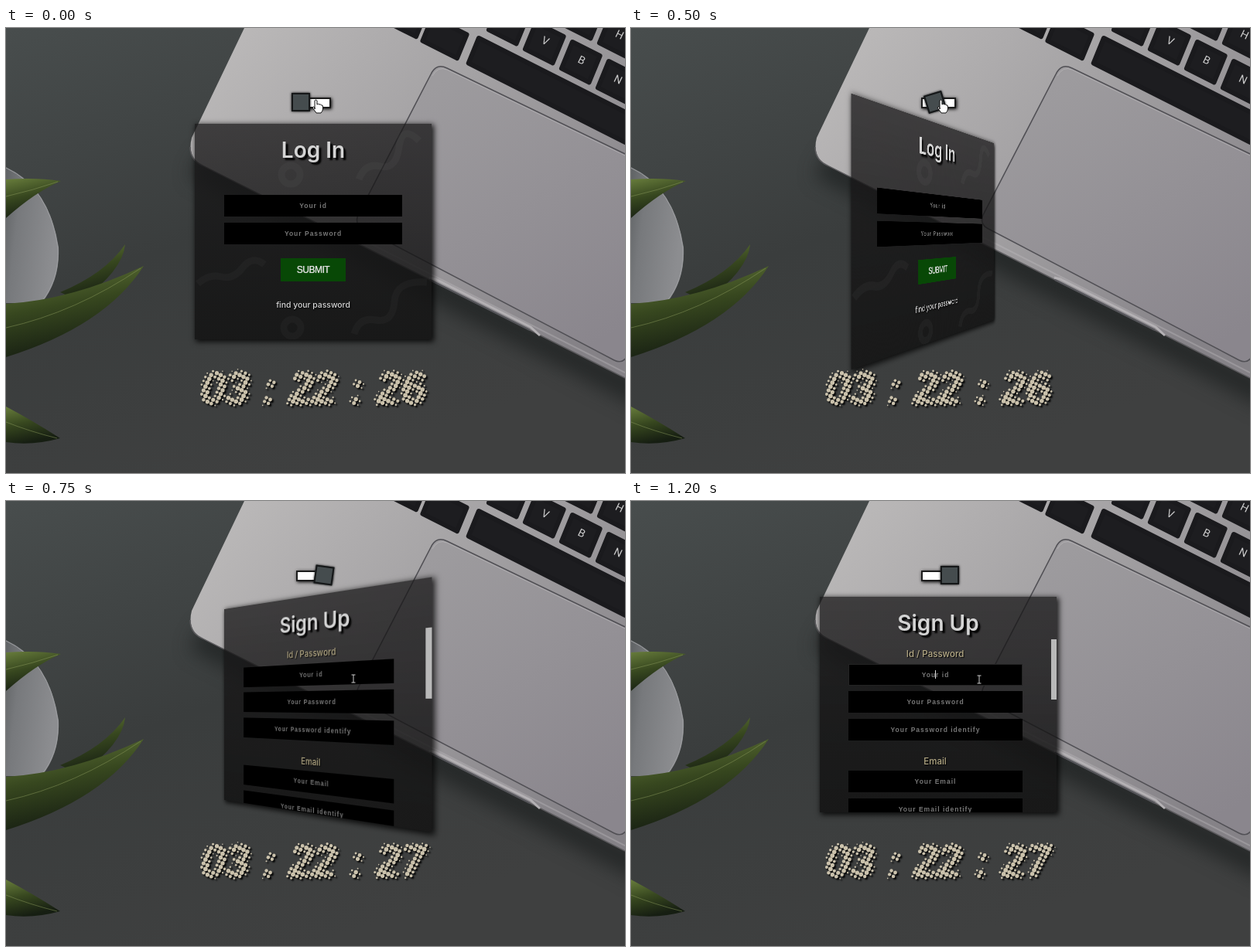
Animation, 800 px wide and 576 px high, one loop 1250 ms. Source, as an HTML page with a canvas:

```html
<!DOCTYPE html>
<html lang="en">
<head>
<meta charset="utf-8">
<title>Flip login card</title>
<style>
html, body { margin: 0; width: 100%; height: 100%; overflow: hidden; background: #3c3e3e; }
#stage { position: relative; width: 800px; height: 576px; overflow: hidden; }
#stage > *, .card > * { position: absolute; }
#scene, #clock, #cursor { left: 0; top: 0; }
.card {
  left: 244px; top: 124px; width: 306px; height: 279px; overflow: hidden;
  background: linear-gradient(rgba(25,24,25,.76), rgba(18,18,18,.85));
  box-shadow: 2px 2px 7px 1px rgba(0,0,0,.85);
}
.card svg { left: 0; top: 0; }
.card div { box-sizing: border-box; text-align: center; white-space: nowrap; }
.title { font: 600 28px Inter, sans-serif; color: #d4d4d4; text-shadow: 3px 3px 2px #000; }
.label { font: 500 11.5px Inter, sans-serif; color: #b5aa86; text-shadow: 1px 1px 1px #000; }
.link { font: 500 10.4px Inter, sans-serif; color: #d8d8d8; text-shadow: 1px 1px 2px #000; }
.field { font: bold 8.5px "Liberation Sans", Arial, sans-serif; letter-spacing: 1px; color: #777; background: #000; }
.button { font: 12px "Liberation Sans", Arial, sans-serif; letter-spacing: -.5px; color: #e6e6e6; background: #084806; text-shadow: 0 0 1px #ccc; }
.bar { background: #b9b9b9; }
.caret { background: #ddd; }
#track { left: 375px; top: 90px; width: 41px; height: 10px; border: 2px solid #1c1c1c; background: #fff; box-shadow: 1px 1px 4px #000; }
#knob { left: -12px; top: -12px; width: 20px; height: 20px; border: 2px solid #151718; background: #454c4e; box-shadow: 0 0 3px #000; }
</style>
</head>
<body>
<div id="stage">
  <svg id="scene" width="800" height="576">
    <defs>
      <linearGradient id="desk" x2=".5" y2="1">
        <stop stop-color="#484d4d"/><stop offset=".5" stop-color="#3a3d3d"/><stop offset="1" stop-color="#3f4040"/>
      </linearGradient>
      <linearGradient id="metal" gradientUnits="userSpaceOnUse" x1="270" y1="40" x2="720" y2="420">
        <stop stop-color="#bab8b8"/><stop offset=".45" stop-color="#a4a2a4"/><stop offset="1" stop-color="#858287"/>
      </linearGradient>
      <linearGradient id="pad" gradientUnits="userSpaceOnUse" x1="540" y1="80" x2="740" y2="420">
        <stop stop-color="#9d9b9e"/><stop offset="1" stop-color="#8a868d"/>
      </linearGradient>
      <linearGradient id="pot" x2="1" y2=".3">
        <stop stop-color="#5f6264"/><stop offset=".3" stop-color="#77797c"/><stop offset="1" stop-color="#8c8d90"/>
      </linearGradient>
      <linearGradient id="leaf" x2=".3" y2="1">
        <stop stop-color="#687d3c"/><stop offset=".5" stop-color="#37471f"/><stop offset="1" stop-color="#161e12"/>
      </linearGradient>
      <filter id="soft" x="-20%" y="-20%" width="140%" height="140%" color-interpolation-filters="sRGB">
        <feGaussianBlur stdDeviation="12"/>
      </filter>
    </defs>
    <rect width="800" height="576" fill="url(#desk)"/>
    <path d="M246 176L830 478" stroke="#17191a" stroke-opacity=".6" stroke-width="36" filter="url(#soft)"/>
    <path d="M308 0L240 142Q234 166 252 177L800 453V0Z" fill="url(#metal)"/>
    <path d="M238 154Q238 170 252 177L800 453" fill="none" stroke="#5c5b5e" stroke-width="1.5"/>
    <path d="M455 271L800 446" stroke="#c0bdc0" stroke-opacity=".35" stroke-width="2"/>
    <path d="M547 323L555 325 678 387 690 398" fill="none" stroke="#b4b1b4" stroke-width="3"/>
    <path d="M548 326L677 391" stroke="#55555a" stroke-width="2"/>
    <path d="M800 163L570 52Q556 45 549 60L455 242Q450 254 462 260L786 430Q796 435 802 426" fill="url(#pad)" stroke="#515055" stroke-width="1.6"/>
    <path d="M800 165L570 54Q558 49 551 62" fill="none" stroke="#c4c2c4" stroke-opacity=".5"/>
    <g id="keys" fill="#1d1d20" stroke="#1a1a1d" stroke-width="6" stroke-linejoin="round"></g>
    <path d="M0 180Q56 206 68 284Q70 326 46 356H0Z" fill="url(#pot)"/>
    <path d="M0 181Q56 207 67 284Q69 326 46 354" fill="none" stroke="#9c9da0"/>
    <g fill="url(#leaf)">
      <path d="M0 196Q38 193 71 198Q38 212 0 246Z"/>
      <path d="M70 342Q128 318 154 280Q151 314 96 354Z"/>
      <path d="M0 357Q85 352 178 308Q128 386 0 426Z"/>
      <path d="M0 490Q34 508 70 531Q35 541 0 536Z"/>
    </g>
    <path d="M0 388Q90 368 174 311M0 218Q35 210 67 199M0 510Q30 522 66 531" fill="none" stroke="#8a9a5c" stroke-opacity=".5"/>
  </svg>
  <div class="card" id="login"></div>
  <div class="card" id="signup"></div>
  <canvas id="clock" width="800" height="576"></canvas>
  <div id="track"></div>
  <div id="knob"></div>
  <svg id="cursor" width="800" height="576" fill="#fff" stroke="#111">
    <path id="hand" d="M-2 6V-5Q-.5-7 1-5V0Q2.500-1.500 4 0Q5.500-1 6.500 1Q8.500 0 8.500 3V6Q8 9 6 11H0Q-2 8-5 4Q-4 2-2 4Z"/>
    <path id="arrow" d="M0 0V12L3 9.500 5 14 7 13 5 8.500H9Z"/>
    <path id="beam" d="M-2.500-5H2.500M0-5V5M-2.500 5H2.500" stroke="#ccc"/>
  </svg>
</div>
<script>
const $ = id => document.getElementById(id);
const LOOP = 1250, STEP = 50;

// Keyboard: each key is a slanted quad given by its top left corner and size
function key(x, y, letter = '', w = 40, h = 37) {
  const px = w * .89, py = w * .45, qx = -h * .38, qy = h * .93;
  $('keys').innerHTML += `<path d="M${x} ${y}l${px} ${py} ${qx} ${qy} ${-px} ${-py}z"/>
    <text transform="translate(${x + (px + qx) / 2} ${y + (py + qy) / 2}) rotate(26)" text-anchor="middle" y="2"
    font-family="Roboto, sans-serif" font-size="14" fill="#ccc" stroke="none">${letter}</text>`;
}
[[685, -7, 'V'], [732, 18, 'B'], [779, 43, 'N'], [638, -32], [781, -15, 'H'], [734, -39],
 [551, -14, '', 50, 33], [498, -42, '', 50, 33], [611, 13, '', 260, 35]].forEach(k => key(...k));

// Card contents, placed in stage coordinates
function box(card, cls, x, y, w, h, text = '') {
  const el = document.createElement('div');
  el.className = cls;
  el.textContent = text;
  el.style.cssText = `left:${x - 244}px;top:${y - 124}px;width:${w}px;height:${h}px;line-height:${h}px`;
  $(card).append(el);
  return el;
}
$('login').innerHTML = `<svg width="306" height="279" fill="none" stroke="#fff" stroke-opacity=".028" stroke-width="9">
  <path d="M4 207Q18 194 34 198T62 186T90 182M206 272Q212 250 234 254T258 230T300 205M212 72Q220 50 240 55T264 30T290 22"/>
  <circle cx="124" cy="66" r="12"/><circle cx="126" cy="264" r="11"/></svg>`;
box('login', 'title', 297, 141, 200, 34, 'Log In');
box('login', 'field', 282, 216, 230, 28, 'Your id');
box('login', 'field', 282, 252, 230, 28, 'Your Password');
box('login', 'button', 355, 298, 84, 30, 'SUBMIT');
box('login', 'link', 297, 349, 200, 20, 'find your password');

box('signup', 'title', 297, 141, 200, 34, 'Sign Up');
box('signup', 'label', 293, 188, 200, 20, 'Id / Password');
box('signup', 'label', 293, 327, 200, 20, 'Email');
const fields = [[211, 'Your id'], [246, 'Your Password'], [282, 'Your Password identify'],
  [349, 'Your Email'], [385, 'Your Email identify']]
  .map(([y, text]) => box('signup', 'field', 281, y, 225, 28, text));
box('signup', 'bar', 543, 179, 7, 78);
const caret = box('signup', 'caret', 393, 219, 1, 11);

// Halftone clock: sample blurred text on a tilted square grid
const ctx = $('clock').getContext('2d');
const centers = [268, 299, 341, 382, 412, 454, 495, 527];
const PITCH = 5.5, TILT = .46;
function drawClock(time) {
  const ink = new OffscreenCanvas(800, 576).getContext('2d');
  ink.font = 'italic bold 60px "Liberation Sans", Arial, sans-serif';
  ink.textAlign = 'center';
  ink.filter = 'blur(2px)';
  [...time].forEach((c, i) => ink.fillText(c, centers[i], 487));
  const data = ink.getImageData(0, 0, 800, 576).data;
  ctx.clearRect(0, 0, 800, 576);
  ctx.fillStyle = '#cbc2ac';
  ctx.shadowColor = '#000';
  ctx.shadowBlur = 2;
  ctx.shadowOffsetX = ctx.shadowOffsetY = 2;
  const c = PITCH * Math.cos(TILT), s = PITCH * Math.sin(TILT);
  for (let i = -40; i < 40; i++)
    for (let j = -40; j < 40; j++) {
      const x = 398 + i * c - j * s, y = 466 + i * s + j * c;
      if (y < 438 || y > 494) continue;
      const a = data[(Math.round(y) * 800 + Math.round(x)) * 4 + 3] / 255;
      if (a < .06) continue;
      ctx.beginPath();
      ctx.arc(x, y, 3 * Math.sqrt(a), 0, 7);
      ctx.fill();
    }
}

// Linear track through [time, value] points
function at(t, points) {
  let [t0, v0] = points[0];
  for (const [t1, v1] of points) {
    if (t < t1) return t <= t0 ? v0 : v0 + (v1 - v0) * (t - t0) / (t1 - t0);
    [t0, v0] = [t1, v1];
  }
  return v0;
}
const flip = [[340, 0], [400, 9.5], [450, 31], [500, 55], [550, 78], [600, 100], [650, 119],
  [700, 135], [750, 148], [800, 159], [850, 168], [900, 175], [950, 180]];
const slide = [[350, 381], [400, 382], [500, 393], [550, 399], [650, 408], [750, 411], [850, 412]];
const spin = [[340, 0], [400, -6], [500, -17], [650, -49], [750, -82], [850, -90]];
const mouseX = [[500, 401], [650, 410], [750, 449], [900, 451], [950, 451], [1100, 450]];
const mouseY = [[500, 99], [650, 119], [750, 230], [850, 231]];

let shown;
function draw(now) {
  const t = Math.floor(now % LOOP / STEP) * STEP;
  const angle = at(t, flip), front = angle < 90;
  const lift = t < 1050 ? 7 : 0, focused = t >= 1100;

  $('login').style.display = front ? '' : 'none';
  $('signup').style.display = front ? 'none' : '';
  $('login').style.transform = angle ? `perspective(570px) rotateY(${angle}deg)` : 'none';
  $('signup').style.transform = `perspective(570px) translateZ(${lift}px) rotateY(${angle - 180}deg)`;
  fields[0].style.border = focused ? '1px solid #242424' : '';
  fields[0].style.lineHeight = focused ? '26px' : '28px';
  caret.style.display = focused ? '' : 'none';

  $('knob').style.transform = `translate(${at(t, slide)}px, 96px) rotate(${at(t, spin)}deg)`;

  const pointer = t < 550 ? 'hand' : t < 700 ? 'arrow' : 'beam';
  for (const id of ['hand', 'arrow', 'beam']) $(id).style.display = id === pointer ? '' : 'none';
  $(pointer).setAttribute('transform', `translate(${at(t, mouseX)} ${at(t, mouseY)})`);

  const time = t < 700 ? '03:22:26' : '03:22:27';
  if (time !== shown) drawClock(shown = time);
}
const start = performance.now();
function tick() {
  draw(performance.now() - start);
  requestAnimationFrame(tick);
}
tick();
</script>
</body>
</html>
```
